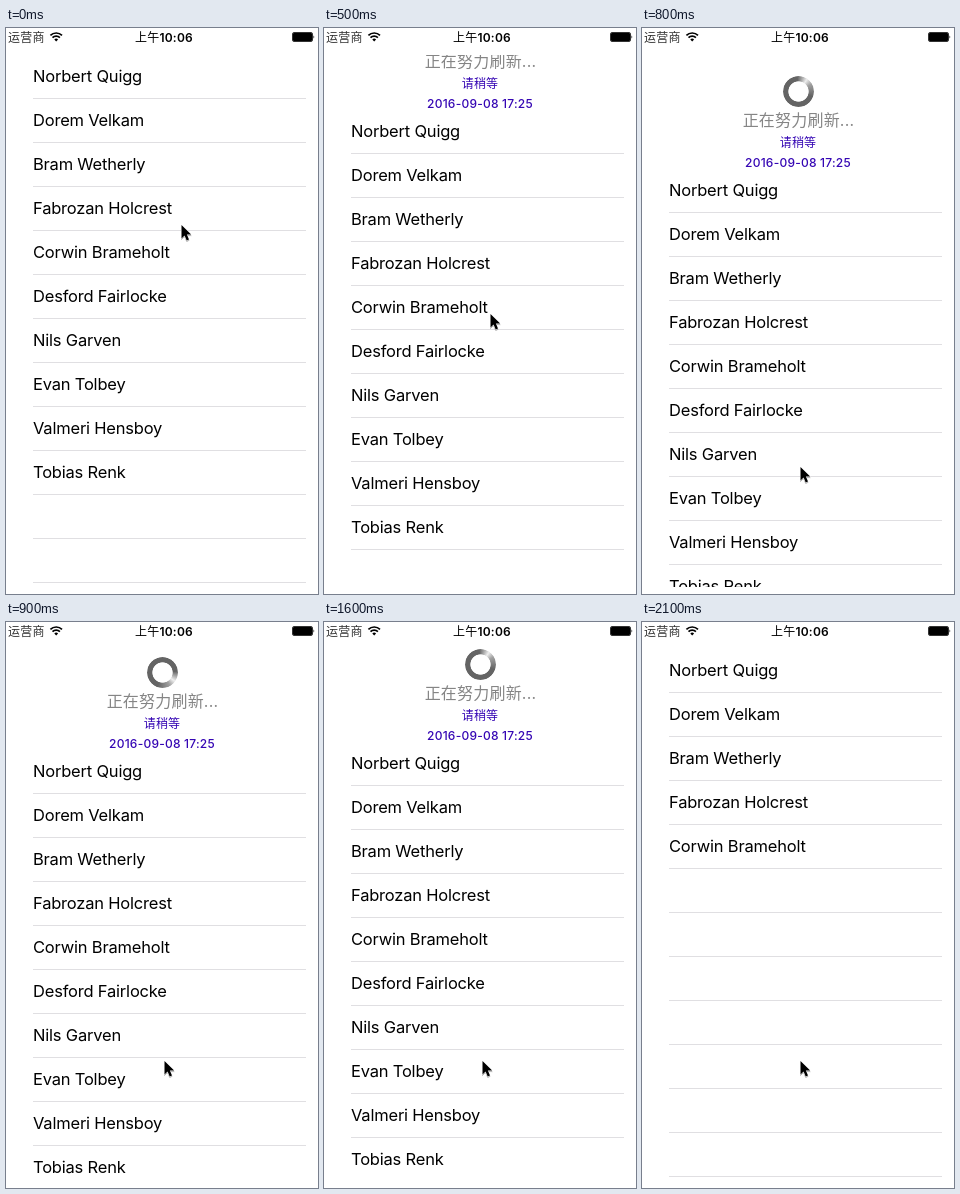
These frames come from a looping animation (312 px wide and 566 px high, 2.4 s). An HTML page:

```html
<!DOCTYPE html>
<html lang="zh-CN">
<head>
<meta charset="utf-8">
<title>下拉刷新</title>
<style>
  html, body { margin: 0; width: 100%; height: 100%; overflow: hidden; background: #fff; }
  body { position: relative; }
  svg { position: absolute; left: 0; top: 0; }
  text { font-family: Inter, "Noto Sans CJK SC", "Noto Sans CJK", sans-serif; }
  .row { font-size: 16.5px; letter-spacing: -0.2px; }
  .mid { text-anchor: middle; }
  .title { font-size: 16px; letter-spacing: 0.2px; fill: #858585; }
  .note { font-size: 12px; letter-spacing: 0.22px; font-weight: 500; fill: #3506b4; }
  .status { font-size: 12px; letter-spacing: 0.2px; }
  .window { position: absolute; left: 0; top: 27px; width: 312px; height: 532px; overflow: hidden; }
  #ring {
    position: absolute; left: 140.5px; top: -93px; width: 31px; height: 31px; border-radius: 50%;
    -webkit-mask: radial-gradient(circle, transparent 9.8px, #000 10.5px);
    mask: radial-gradient(circle, transparent 9.8px, #000 10.5px);
  }
</style>
</head>
<body>
<svg width="312" height="566" viewBox="0 0 312 566">
  <defs><clipPath id="view"><rect y="27" width="312" height="532"/></clipPath></defs>
  <text class="status" x="2" y="13.5" fill="#333">运营商</text>
  <g fill="none" stroke="#000" stroke-width="1.7">
    <path d="M44.4 7.4a8.2 8.2 0 0 1 11.6 0M46.5 9.7a5.2 5.2 0 0 1 7.4 0"/>
    <path d="M50.2 13.4l-1.9-1.9a2.7 2.7 0 0 1 3.8 0z" fill="#000" stroke="none"/>
  </g>
  <text class="status mid" x="158" y="13.5" font-weight="600"><tspan font-weight="500">上午</tspan>10:06</text>
  <rect x="286.5" y="4.5" width="20" height="9" rx="1.5" fill="none" stroke="#333"/>
  <rect x="287" y="5" width="19" height="8" rx=".8"/>
  <path d="M307.5 7.3q1.6 1.7 0 3.4z"/>
  <g clip-path="url(#view)">
    <g id="list">
      <text class="title mid" x="156.5" y="-16">正在努力刷新...</text>
      <text class="note mid" x="156" y="5">请稍等</text>
      <text class="note mid" x="156" y="24.6">2016-09-08 17:25</text>
    </g>
  </g>
</svg>
<div class="window"><div id="ring"></div></div>
<svg width="312" height="566" viewBox="0 0 312 566">
  <path id="cursor" d="M.5 1V14.4l3.1-2.9 2.1 4.9 2.3-1-2.1-4.8h4.3z" stroke="#fff" stroke-width="1"
    paint-order="stroke" style="filter: drop-shadow(0 1px .6px rgba(0,0,0,.3))"/>
</svg>
<script>
const names = ['Norbert Quigg', 'Dorem Velkam', 'Bram Wetherly', 'Fabrozan Holcrest', 'Corwin Brameholt',
  'Desford Fairlocke', 'Nils Garven', 'Evan Tolbey', 'Valmeri Hensboy', 'Tobias Renk'];
const LOOP = 2400, STEP = 100, ROW = 44;
const DRAG = 300, RELEASE = 800, CLOSE = 1800;
const REST = 93;

const byId = id => document.getElementById(id);
const list = byId('list'), ring = byId('ring'), cursor = byId('cursor');

function add(tag, attrs, label = '') {
  const el = document.createElementNS('http://www.w3.org/2000/svg', tag);
  for (const key in attrs) el.setAttribute(key, attrs[key]);
  el.textContent = label;
  return list.appendChild(el);
}

for (let i = 0; i < 12; i++)
  add('rect', { x: 27, y: 70 + i * ROW, width: 273, height: 1, fill: '#e0dfe2' });
const labels = names.map((name, i) => add('text', { class: 'row', x: 27, y: 54.3 + i * ROW }, name));

const progress = (t, from, to) => Math.min(1, Math.max(0, (t - from) / (to - from)));
const grab = t => progress(t, 0, DRAG);
const drag = t => progress(t, DRAG, RELEASE) ** 1.11;

// Resistance grows with the distance pulled.
function pull(t) {
  const travel = 0.535 * (26 * grab(t) ** 2 + 240 * drag(t));
  return travel / (1 + travel / 566);
}

function offsetAt(t) {
  if (t <= RELEASE) return pull(t);
  const settled = REST + (pull(RELEASE) - REST) * 0.38 ** ((t - RELEASE) / 100);
  const closing = progress(t, CLOSE, CLOSE + 275);
  return settled * (1 + Math.cos(Math.PI * closing)) / 2;
}

function draw(now) {
  const t = Math.floor((now % LOOP) / STEP) * STEP;
  const offset = Math.round(offsetAt(t));
  const x = 175 - 5 * grab(t) - 12 * drag(t);
  const y = 196 + 2 * grab(t) + 240 * drag(t);
  list.setAttribute('transform', `translate(0 ${offset})`);
  cursor.setAttribute('transform', `translate(${Math.round(x)} ${Math.round(y)})`);
  labels.forEach((el, i) => el.setAttribute('visibility', i > 4 && t > CLOSE ? 'hidden' : 'visible'));

  const turn = 125 + (t - 900) * 0.9;
  ring.style.transform = `translateY(${offset}px)`;
  ring.style.background =
    `conic-gradient(from ${turn}deg, #eee, #a0a0a0 25deg, #646464 75deg, #646464 320deg, #eee)`;
}

const start = performance.now();
function tick() {
  draw(performance.now() - start);
  requestAnimationFrame(tick);
}
tick();
</script>
</body>
</html>
```
